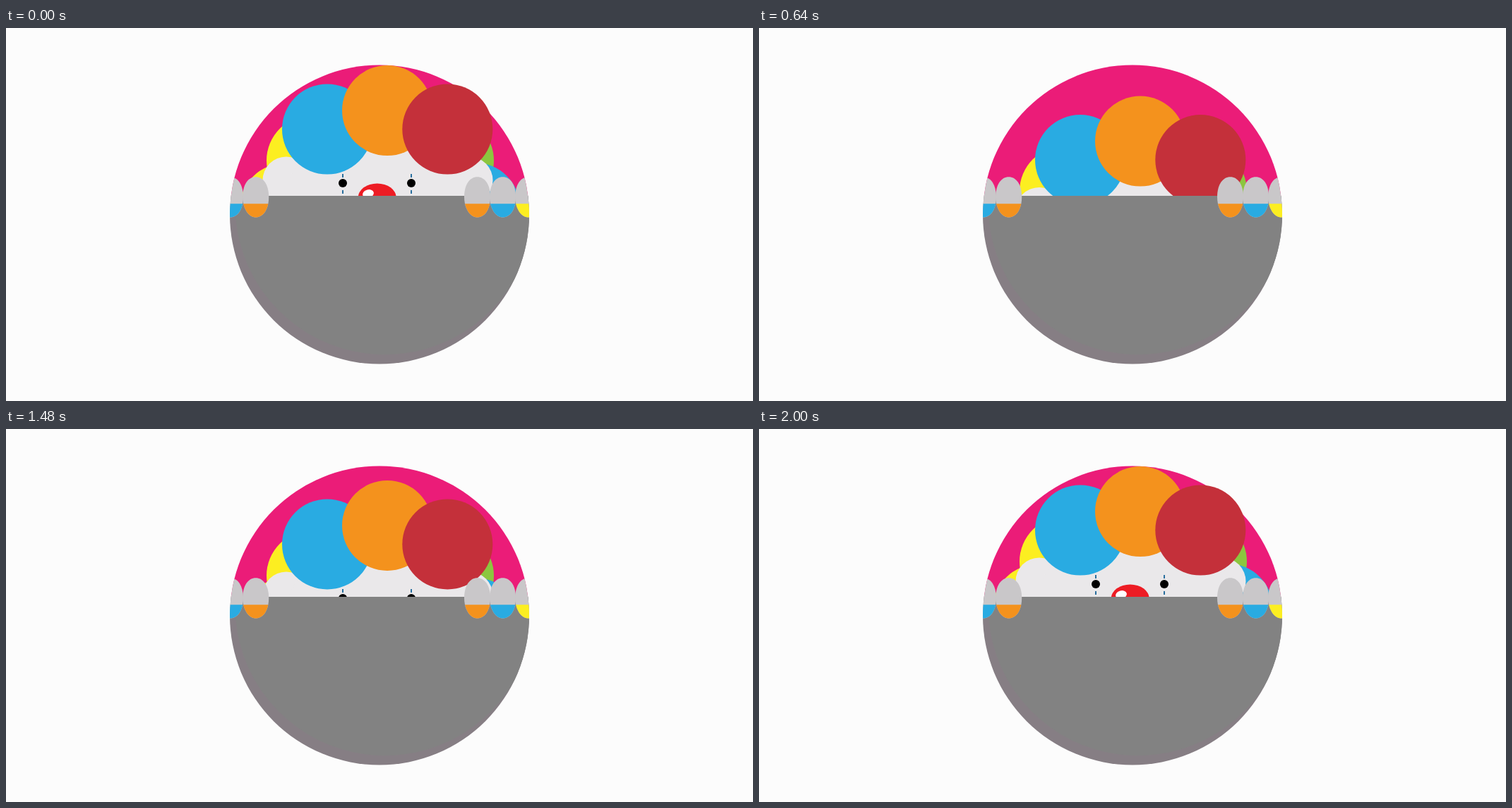
An HTML page that plays this animation: 1058x529 px, repeating every 2040 ms.

```html
<!DOCTYPE html>
<html lang="en">
<head>
<meta charset="utf-8">
<title>Peeking clown</title>
<style>
html, body { margin: 0; width: 100%; height: 100%; overflow: hidden; background: #fcfcfc; }
svg { display: block; width: 100%; height: 100%; }
</style>
</head>
<body>
<svg viewBox="0 0 1058 529">
  <defs>
    <clipPath id="badge"><circle cx="529" cy="264.5" r="212"/></clipPath>
    <clipPath id="aboveWall"><rect width="1058" height="238"/></clipPath>
    <clipPath id="nailArea"><rect x="-19" y="9.5" width="38" height="20"/></clipPath>
    <path id="finger" d="M-18.5 0C-18.5-18-10.5-28.5 0-28.5S18.5-18 18.5 0 10.2 28.8 0 28.8-18.5 16-18.5 0Z"/>
    <g id="eye">
      <path d="M0-13v5M0 10v5" stroke="#2a6f9e" stroke-width="2"/>
      <circle r="6" fill="#000"/>
    </g>
  </defs>
  <rect width="1058" height="238" fill="#eb1c78" clip-path="url(#badge)"/>
  <g clip-path="url(#aboveWall)">
    <g id="clown">
      <circle cx="433" cy="188" r="64" fill="#fcee21"/>
      <circle cx="627" cy="188" r="64" fill="#8cc63f"/>
      <circle cx="395" cy="256" r="64" fill="#fcee21"/>
      <circle cx="664" cy="255" r="64" fill="#29abe2"/>
      <g fill="#eae8ea">
        <circle cx="397" cy="216" r="33.5"/>
        <circle cx="656" cy="216" r="33.5"/>
        <ellipse cx="526" cy="250" rx="132" ry="110"/>
      </g>
      <use href="#eye" x="477" y="220"/>
      <use href="#eye" x="574" y="220"/>
      <ellipse cx="525.7" cy="240.5" rx="27" ry="20" fill="#ed1c24"/>
      <ellipse cx="513" cy="235" rx="8" ry="5.7" fill="#fff" transform="rotate(-15 513 235)"/>
      <circle cx="455" cy="143.5" r="64" fill="#29abe2"/>
      <circle cx="540" cy="117" r="64" fill="#f4921d"/>
      <circle cx="625.3" cy="143.5" r="64" fill="#c4303a"/>
    </g>
  </g>
  <g clip-path="url(#badge)">
    <rect y="238" width="1058" height="291" fill="#867e84"/>
    <path d="M300 238H760V340H729A212 212 0 0 1 324.5 252V238Z" fill="#828282"/>
    <g id="hands"></g>
  </g>
</svg>
<script>
const LOOP = 2040, STEP = 40, LOWEST = 480, END = 2000, DEPTH = 44.4;
const clown = document.getElementById('clown');

const fingers = [
  [317.5, '#29abe2'], [353.7, '#f4921d'],
  [667.5, '#f4921d'], [703.6, '#29abe2'], [739.7, '#fcee21']
];
document.getElementById('hands').innerHTML = fingers.map(([x, nail]) => `
  <g transform="translate(${x} 239.7)">
    <use href="#finger" fill="#c9c7c9"/>
    <g clip-path="url(#nailArea)"><use href="#finger" fill="${nail}"/></g>
  </g>`).join('');

// Cubic from 0 to 1 that starts at rest; the bend sets its final speed.
const leave = (u, bend) => bend * u * u + (1 - bend) * u ** 3;

function drop(t) {
  if (t >= END) return 0;
  const away = t < LOWEST
    ? leave(1 - t / LOWEST, 2.66)
    : leave((t - LOWEST) / (END - LOWEST), 1.8);
  return DEPTH * (1 - away);
}

function draw() {
  const t = Math.floor(performance.now() % LOOP / STEP) * STEP;
  clown.setAttribute('transform', `translate(0 ${drop(t).toFixed(2)})`);
  requestAnimationFrame(draw);
}
draw();
</script>
</body>
</html>
```
